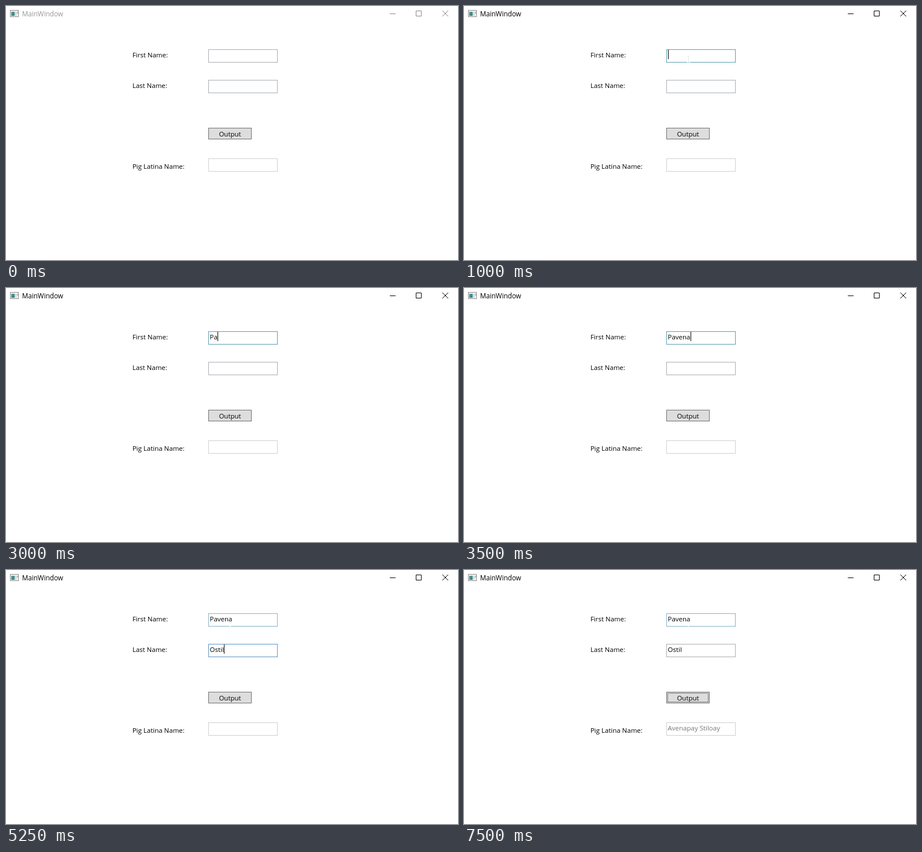
Recreate the animation shown at these times as an HTML page. Size 782 px wide and 440 px high, loop 8 s.

```html
<!DOCTYPE html>
<html lang="en">
<head>
<meta charset="utf-8">
<title>MainWindow</title>
<style>
  html, body { margin: 0; width: 100%; height: 100%; overflow: hidden; background: #fff; }
  svg { display: block; width: 782px; height: 440px; }
  text { font: 11.5px "Open Sans", "Noto Sans", sans-serif; white-space: pre; }
  .line { fill: none; stroke-width: 1; }
  .crisp { shape-rendering: crispEdges; }
</style>
</head>
<body>
<svg viewBox="0 0 782 440">
  <defs>
    <linearGradient id="teal" x1="0" y1="0" x2="1" y2="1">
      <stop offset="0" stop-color="#5f9ea0"/>
      <stop offset="1" stop-color="#2f7f80"/>
    </linearGradient>
  </defs>
  <rect width="782" height="440" fill="#fff"/>

  <g class="crisp">
    <rect x="7.5" y="7.5" width="14" height="11" fill="#f4f4f4" stroke="#8c8c8c"/>
    <rect x="9" y="10" width="6" height="7" fill="url(#teal)"/>
    <rect x="16" y="10" width="2" height="7" fill="#c4d2d2"/>
    <rect x="19" y="10" width="2" height="3" fill="#b8b8b8"/>
  </g>
  <text id="title" x="27.7" y="18" style="font-size:11.7px">MainWindow</text>
  <g id="controls" class="line">
    <path d="M664 13.5h10M709.5 8.5h9v9h-9z"/>
    <path d="M755 8l10 10M765 8l-10 10"/>
  </g>

  <text x="218.7" y="89">First Name:</text>
  <text x="218.7" y="142">Last Name:</text>
  <text x="218.7" y="282">Pig Latina Name:</text>

  <rect id="firstBox" class="line" x="350.5" y="75.5" width="119" height="22"/>
  <rect id="lastBox" class="line" x="350.5" y="128.5" width="119" height="22"/>
  <rect class="line" x="350.5" y="264.5" width="119" height="22" stroke="#cfcfcf"/>
  <text id="first" x="352.5" y="89"></text>
  <text id="last" x="352.5" y="142"></text>
  <text id="result" x="352.5" y="278" fill="#787878"></text>
  <rect id="caret" class="crisp" width="1" height="16"/>

  <rect x="350.5" y="211.5" width="74" height="19" fill="#ddd" stroke="#707070"/>
  <rect id="focusRing" class="line" x="352.5" y="213.5" width="70" height="15" stroke="#222" stroke-dasharray="1" stroke-dashoffset=".5"/>
  <text x="387.5" y="226" text-anchor="middle">Output</text>

  <path id="arrow" d="M.5 .5v16l3.7-3.6 2.4 5.6 2.3-1-2.4-5.4h5.2z" fill="#fff" stroke="#000"/>
  <path id="beam" class="line" d="M386 86.5h2M389 86.5h2M388.5 87v10M386 97.5h2M389 97.5h2" stroke="#e6eaea"/>
  <rect id="notch" x="387" y="97" width="2" height="1" fill="#e8f0f0"/>
</svg>
<script>
const LOOP = 8000;
const FIRST = "Pavena", LAST = "Ostil", RESULT = "Avenapay Stiloay";
const GREY = "#abadb3";
const $ = id => document.getElementById(id);

// Each track lists [start time, value]; a value holds until the next entry.
const tracks = {
  arrow: [[0, null], [250, [370, 188]], [500, [356, 57]], [750, null]],
  active: [[0, false], [1000, true]],
  firstLetters: [[0, 0], [2500, 1], [2750, 2], [3250, 5], [3500, 6]],
  lastLetters: [[0, 0], [4500, 1], [5000, 2], [5250, 5]],
  firstBorder: [[0, GREY], [750, "#84b5c6"], [1000, "#5a9fae"], [4000, "#86b6c2"], [7500, "#86b1cb"]],
  lastBorder: [[0, GREY], [4000, "#5c94c4"], [5750, GREY]],
  caret: [[0, null], [1000, "first"], [1500, null], [2000, "first"], [2750, null],
          [3000, "first"], [4000, "last"], [5750, null]]
};

const at = (name, t) => tracks[name].findLast(([start]) => start <= t)[1];
const show = (id, on) => $(id).setAttribute("visibility", on ? "visible" : "hidden");
const setText = (id, value) => {
  if ($(id).textContent !== value) $(id).textContent = value;
};

function render(t) {
  const active = at("active", t);
  $("title").setAttribute("fill", active ? "#000" : "#999");
  $("controls").setAttribute("stroke", active ? "#000" : "#888");
  $("firstBox").setAttribute("stroke", at("firstBorder", t));
  $("lastBox").setAttribute("stroke", at("lastBorder", t));

  setText("first", FIRST.slice(0, at("firstLetters", t)));
  setText("last", LAST.slice(0, at("lastLetters", t)));
  setText("result", t >= 6250 ? RESULT : "");

  const field = at("caret", t);
  show("caret", field);
  if (field) {
    $("caret").setAttribute("x", Math.round(353 + $(field).getComputedTextLength()));
    $("caret").setAttribute("y", field === "first" ? 76 : 129);
  }

  const arrow = at("arrow", t);
  show("arrow", arrow);
  if (arrow) $("arrow").setAttribute("transform", `translate(${arrow})`);
  show("beam", t >= 750 && t < 2500);
  show("notch", t >= 4000);
  show("focusRing", t >= 5750);
}

const startTime = performance.now();
function tick() {
  render((performance.now() - startTime) % LOOP);
  requestAnimationFrame(tick);
}
tick();
</script>
</body>
</html>
```
